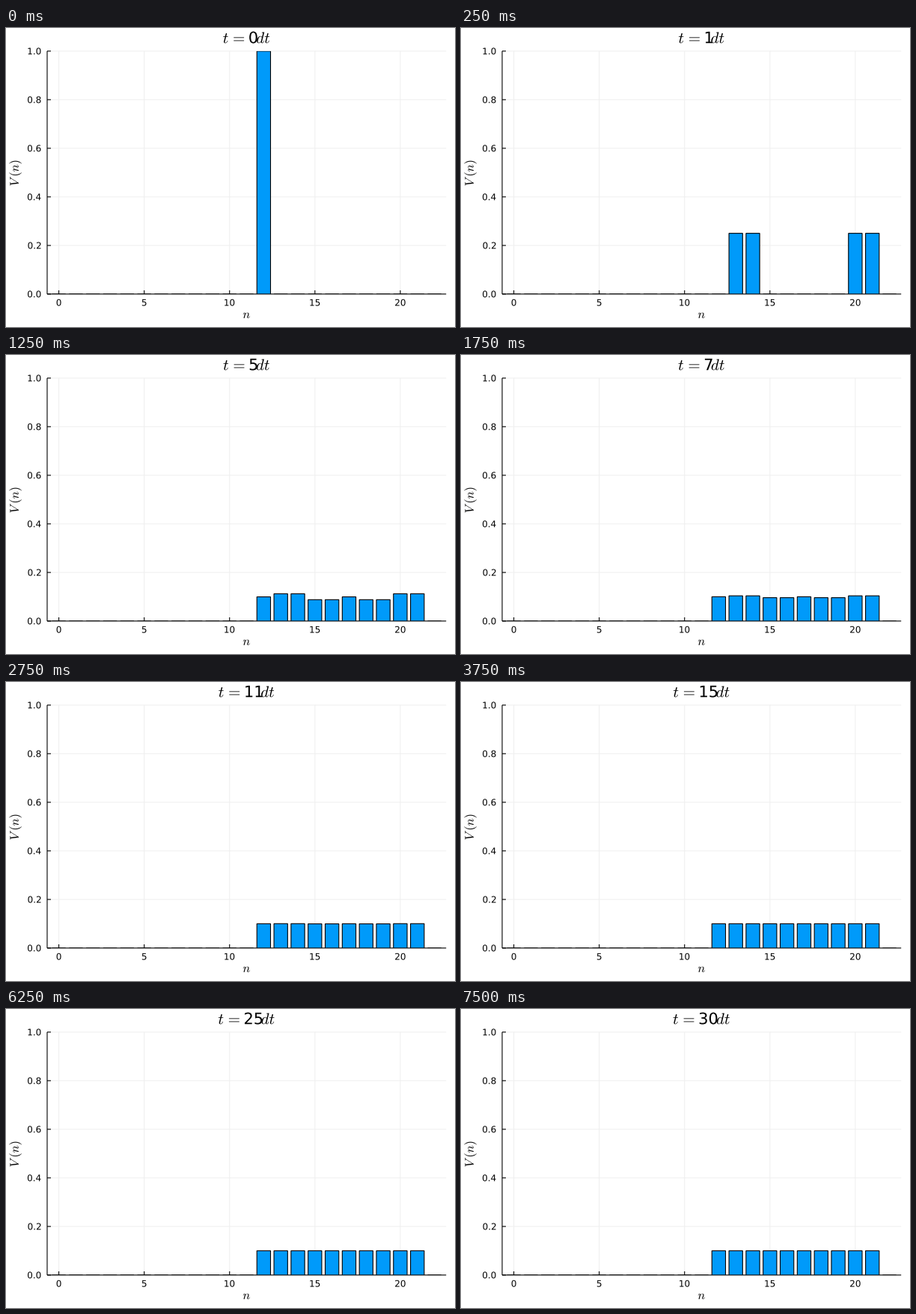
A matplotlib script that plays this animation: 600x400 px, repeating every 7.75 s.

```python
import matplotlib.pyplot as plt
import numpy as np
from matplotlib.animation import FuncAnimation
from matplotlib.patches import PathPatch, Rectangle
from matplotlib.textpath import TextPath
from matplotlib.transforms import Affine2D

plt.rcParams["font.family"] = "DejaVu Sans"
plt.rcParams["mathtext.fontset"] = "cm"

W, H, DPI = 600, 400, 100
PX = 72 / DPI                      # one pixel in points
LEFT, RIGHT = 55.0, 588.2
TOP, BOTTOM = 30.9, 355.9          # measured from the top edge
ORIGIN, PITCH = 70.6, 22.815       # x of site 0, distance between sites
SITES, START, RING = 23, 12, 10    # the walk lives on a ring of sites
STEPS, INTERVAL = 31, 250
TITLE_SIZE, LABEL_SIZE, TICK_SIZE = 21, 16.5, 12
TITLE_X, TITLE_BASE = 321.4, 20.2
DIGIT_ADVANCE = 0.636 * TITLE_SIZE
PREFIX, SUFFIX = 33.9, 18.5        # widths of "t =" and "dt"

fig = plt.figure(figsize=(W / DPI, H / DPI), dpi=DPI, facecolor="white")
ax = fig.add_axes([0, 0, 1, 1])
ax.set_xlim(0, W)
ax.set_ylim(0, H)
ax.axis("off")


def px(n):
    return ORIGIN + n * PITCH


def py(v):
    return H - BOTTOM + v * (BOTTOM - TOP)


def line(x, y, color="black", z=2):
    ax.plot(x, y, color=color, lw=1.1 * PX, zorder=z,
            solid_capstyle="butt", snap=False)


def outline(text, size, angle=0):
    path = TextPath((0, 0), text, size=size)
    return Affine2D().rotate_deg(angle).transform_path(path)


def moved(path, dx, dy):
    return Affine2D().translate(dx, dy).transform_path(path)


def ink_left(path, x):
    """Put the left edge of the ink at x, on the title's baseline."""
    return moved(path, x - path.get_extents().x0, H - TITLE_BASE)


def add_path(path):
    patch = PathPatch(path, facecolor="black", lw=0, zorder=5)
    ax.add_patch(patch)
    return patch


def draw_axes():
    bottom = H - BOTTOM
    for n in range(0, 21, 5):
        x = px(n)
        line([x, x], [bottom, H - TOP], "#f0f0f0", 1)
        line([x, x], [bottom, bottom + 5])
        label = outline(str(n), TICK_SIZE)
        box = label.get_extents()
        add_path(moved(label, x - (box.x0 + box.x1) / 2, H - 371.6))
    for k in range(6):
        v = k / 5
        y = py(v)
        line([LEFT, RIGHT], [y, y], "#f0f0f0", 1)
        line([LEFT, LEFT + 5], [y, y])
        label = outline(f"{v:.1f}", TICK_SIZE)
        add_path(moved(label, 46.5 - label.get_extents().x1, y - 4.4))
    line([LEFT, RIGHT], [bottom, bottom])
    line([LEFT, LEFT], [bottom, H - TOP])


def draw_axis_names():
    name = outline("$n$", LABEL_SIZE)
    box = name.get_extents()
    add_path(moved(name, 321.3 - (box.x0 + box.x1) / 2, H - 388.2))
    name = outline(r"$V\:(n)$", LABEL_SIZE, 90)
    box = name.get_extents()
    add_path(moved(name, 12.6 - (box.x0 + box.x1) / 2, H - 194.2 - (box.y0 + box.y1) / 2))


def walk():
    """Distribution of a walker hopping by 1 or 2 either way on the ring."""
    p = np.zeros(RING)
    p[0] = 1
    history = [p]
    for _ in range(STEPS - 1):
        p = sum(np.roll(p, hop) for hop in (-2, -1, 1, 2)) / 4
        history.append(p)
    return history


draw_axes()
draw_axis_names()
history = walk()

# Bars are cut off at the edges of the plot area.
area = Rectangle((LEFT, H - BOTTOM), RIGHT - LEFT, BOTTOM - TOP,
                 transform=ax.transData, visible=False)
ax.add_patch(area)
bars = []
for n in range(SITES):
    bar = Rectangle((px(n - 0.4), py(0)), 0.8 * PITCH, 0,
                    facecolor="#009afa", edgecolor="black", lw=1.1 * PX,
                    joinstyle="miter", snap=False, zorder=3)
    ax.add_patch(bar)
    bar.set_clip_path(area.get_path(), area.get_transform())
    bars.append(bar)

t_glyph = outline("$t$", TITLE_SIZE)
equals = outline("$=$", TITLE_SIZE)
dt_glyphs = outline("$dt$", TITLE_SIZE)
title = [add_path(g) for g in (t_glyph, equals, t_glyph, dt_glyphs)]


def update(step):
    for bar, p in zip(bars[START:START + RING], history[step]):
        bar.set_height(py(p) - py(0))
    text = str(step)
    # The last digit is only as wide as its ink, so "dt" moves up close.
    last = outline(text[-1], TITLE_SIZE).get_extents().width
    width = (len(text) - 1) * DIGIT_ADVANCE + last
    x = TITLE_X - (PREFIX + width + SUFFIX) / 2
    paths = (
        ink_left(t_glyph, x + 0.3),
        ink_left(equals, x + 14.3),
        moved(outline(text, TITLE_SIZE), x + PREFIX, H - TITLE_BASE),
        ink_left(dt_glyphs, x + PREFIX + width + 0.7),
    )
    for patch, path in zip(title, paths):
        patch.set_path(path)
    return bars + title


anim = FuncAnimation(fig, update, frames=STEPS, interval=INTERVAL,
                     repeat=True, repeat_delay=0, blit=False)
plt.show()
```
